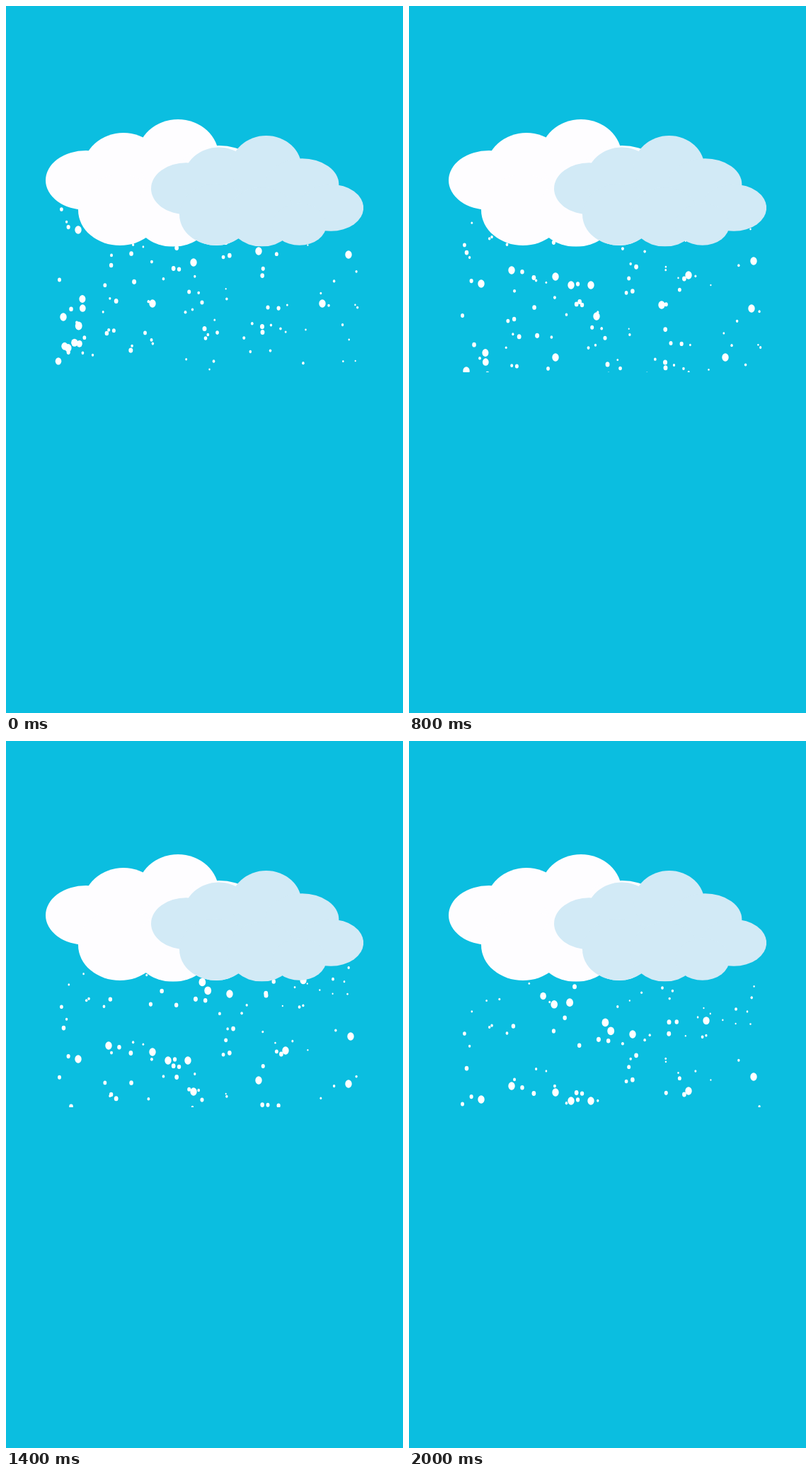
An HTML page with a canvas for the animation above (2100 ms loop, 561 by 998 pixels).

```html
<!DOCTYPE html>
<html>
<head>
<meta charset="utf-8">
<style>
  html, body { margin: 0; width: 100%; height: 100%; overflow: hidden; background: #0bbee0; }
  canvas { display: block; }
</style>
</head>
<body>
<canvas id="stage" width="561" height="998"></canvas>
<script>
const ctx = document.getElementById('stage').getContext('2d');
const LOOP = 2100, STEP = 100;

// One cloud, drawn twice: lobes as [cx, cy, rx, ry]
const lobes = [
  [113, 246, 57, 42], [166, 230, 57, 51], [243, 212, 57.5, 52], [301, 239, 60, 42],
  [348, 277, 53, 38], [161, 288, 59, 50], [236, 292, 56, 48], [297, 304, 44, 34]
];

// Falling speeds in px per ms
const FAST = 0.095, SLOW = 0.063, MIST = 0.0705;

let seed = 7;
const random = () => (seed = seed * 16807 % 2147483647) / 2147483647;
const between = ([a, b]) => a + (b - a) * random();

// The most prominent flakes, where they start
const flakes = [
  [102, 316], [265, 362], [357, 346], [484, 351], [447, 420], [81, 439], [207, 420],
  [145, 297], [229, 318], [257, 318], [395, 304], [487, 284], [207, 306], [316, 224]
].map(([x, y]) => ({ x, y, r: 4.7, speed: FAST }));

function scatter(count, speed, sizes, xs, ys) {
  for (let i = 0; i < count; i++)
    flakes.push({ x: between(xs), y: between(ys), r: between(sizes), speed });
}
scatter(8, FAST, [4, 5], [74, 116], [400, 510]);
scatter(6, FAST, [4, 5], [60, 450], [160, 225]);
scatter(18, FAST, [2.5, 3], [61, 410], [190, 490]);
scatter(31, SLOW, [2.3, 3], [75, 400], [220, 490]);
scatter(38, SLOW, [1.3, 2], [78, 370], [215, 515]);
scatter(46, MIST, [1, 2], [285, 505], [205, 515]);

function ellipse(x, y, rx, ry) {
  ctx.beginPath();
  ctx.ellipse(x, y, rx, ry, 0, 0, 2 * Math.PI);
  ctx.fill();
}

function clip(top, bottom) {
  ctx.beginPath();
  ctx.rect(56, top, 449, bottom - top);
  ctx.clip();
}

// Places the cloud by its top-left corner
function cloud(color, left, top, scale) {
  ctx.save();
  clip(160, 339.5);
  ctx.translate(left, top);
  ctx.scale(scale, scale);
  ctx.translate(-56, -160);
  ctx.fillStyle = color;
  ctx.fillRect(113, 230, 232, 75);
  lobes.forEach(lobe => ellipse(...lobe));
  ctx.restore();
}

function snow(t) {
  ctx.save();
  clip(262, 517);
  ctx.fillStyle = '#fff';
  for (const { x, y, r, speed } of flakes) ellipse(x, y + speed * t, r, r * 1.2);
  ctx.restore();
}

function draw() {
  ctx.fillStyle = '#0bbee0';
  ctx.fillRect(0, 0, 561, 998);
  snow(Math.floor(performance.now() % LOOP / STEP) * STEP);
  cloud('#fefdff', 56, 160, 1);
  cloud('#d2eaf6', 205, 183, 0.87);
  requestAnimationFrame(draw);
}
draw();
</script>
</body>
</html>
```
